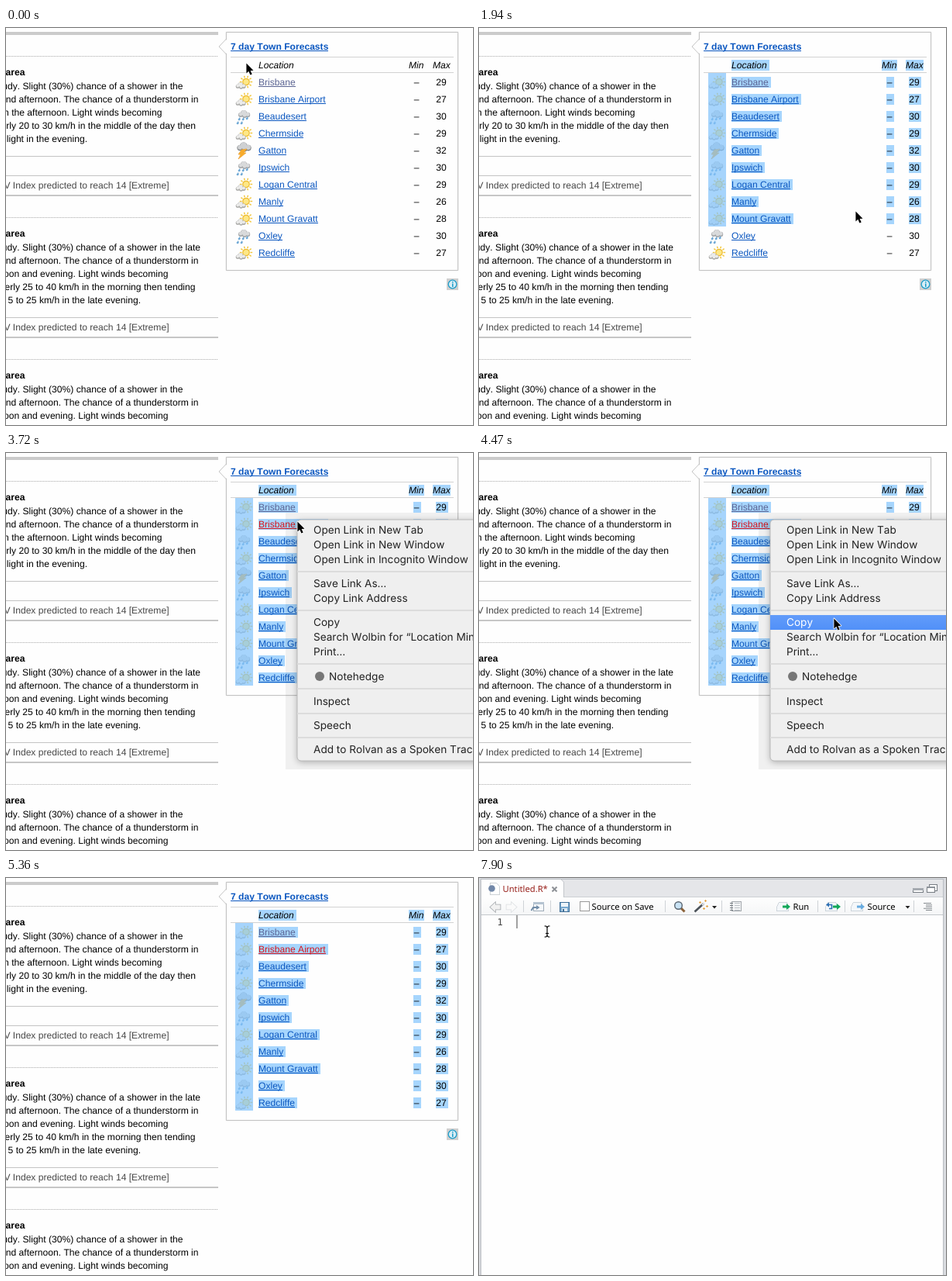
An HTML page with a canvas for the animation above (8 s loop, 603 by 512 pixels).

```html
<!DOCTYPE html>
<html lang="en">
<head>
<meta charset="utf-8">
<title>Copying a forecast table</title>
<style>
html, body { margin: 0; width: 100%; height: 100%; overflow: hidden; background: #fefefe; }
canvas { display: block; width: 603px; height: 512px; }
</style>
</head>
<body>
<canvas id="stage" width="603" height="512"></canvas>
<script>
const ctx = document.getElementById('stage').getContext('2d');
ctx.textRendering = 'geometricPrecision';
ctx.fontKerning = 'none';

const LOOP = 8000;
const SANS = '"Liberation Sans", Arial, sans-serif';
const BODY = '12.1px ' + SANS;
const BOLD = 'bold ' + BODY;
const ITALIC = 'italic ' + BODY;
const MENU = '13.6px Inter, sans-serif';
const TOOL = '500 11.2px "Noto Sans", sans-serif';
const LINK = '#0b57c0', VISITED = '#5c6593', HOVER = '#d8161b', SELECT = '#a6d5fd';

const towns = [
  ['Brisbane', 'sun', 29], ['Brisbane Airport', 'sun', 27], ['Beaudesert', 'rain', 30],
  ['Chermside', 'sun', 29], ['Gatton', 'storm', 32], ['Ipswich', 'rain', 30],
  ['Logan Central', 'sun', 29], ['Manly', 'sun', 26], ['Mount Gravatt', 'sun', 28],
  ['Oxley', 'rain', 30], ['Redcliffe', 'sun', 27]
];

// Lines of the clipped column, each with its right edge.
const thunder = ['and afternoon. The chance of a thunderstorm in', 248.5];
const winds = ['afternoon and evening. Light winds becoming', 209.5];
const days = [
  [36, [['cloudy. Slight (30%) chance of a shower in the', 228.5], thunder,
    ['in the afternoon. Light winds becoming', 201.5],
    ['easterly 20 to 30 km/h in the middle of the day then', 245],
    ['light in the evening.', 105]]],
  [244, [['cloudy. Slight (30%) chance of a shower in the late', 251], thunder, winds,
    ['easterly 25 to 40 km/h in the morning then tending', 244.5],
    ['5 to 25 km/h in the late evening.', 174]]],
  [427, [['cloudy. Slight (30%) chance of a shower in the', 228.5], thunder, winds]]
];

// Baseline, label and left edge; a bare number is a separator.
const menu = [
  [104, 'Open Link in New Tab'], [123, 'Open Link in New Window'],
  [142, 'Open Link in Incognito Window'], 152,
  [173, 'Save Link As…'], [192, 'Copy Link Address'], 202,
  [223, 'Copy'], [242, 'Search Wolbin for “Location Min Max”'], [261, 'Print…'], 271,
  [293, 'Notehedge', 417], 303, [325, 'Inspect'], 335, [356, 'Speech'], 366,
  [387, 'Add to Rolvan as a Spoken Track']
];

// Pointer legs: first step, last step, step count, destination.
const legs = [
  [150, 300, 2, 299, 45], [1050, 1200, 2, 293, 45],
  [1500, 1500, 1, 340, 65], [1640, 2240, 5, 536, 294],
  [2690, 2690, 1, 534, 291], [2840, 3420, 5, 373, 90],
  [3720, 3720, 1, 376, 88], [4020, 4470, 4, 458, 213], [4620, 4920, 3, 461, 216],
  [7010, 7010, 1, 419, 486], [7160, 7900, 6, 88, 69]
];

function pointerAt(t) {
  let x = 310, y = 45;
  for (const [from, to, n, nx, ny] of legs) {
    if (t < from) break;
    const gap = n > 1 ? (to - from) / (n - 1) : 1;
    const step = Math.min(n, 1 + Math.floor((t - from) / gap + 0.04));
    const p = 1 - Math.pow(1 - step / n, 1.5);
    x += (nx - x) * p;
    y += (ny - y) * p;
  }
  return [Math.round(x), Math.round(y)];
}

function rect(x, y, w, h, color) {
  ctx.fillStyle = color;
  ctx.fillRect(x, y, w, h);
}

function text(s, x, y, font, color = '#000', align = 'left') {
  ctx.font = font;
  ctx.fillStyle = color;
  ctx.textAlign = align;
  ctx.fillText(s, x, y);
  return ctx.measureText(s).width;
}

function link(s, x, y, font, color) {
  rect(x, y + 1, Math.round(text(s, x, y, font, color)), 1, color);
}

function trace(points, closed) {
  ctx.beginPath();
  for (let i = 0; i < points.length; i += 2) ctx.lineTo(points[i], points[i + 1]);
  if (closed) ctx.closePath();
}

function poly(points, fill, stroke, width = 1) {
  trace(points, true);
  if (stroke) {
    ctx.strokeStyle = stroke;
    ctx.lineWidth = width;
    ctx.stroke();
  }
  if (fill) {
    ctx.fillStyle = fill;
    ctx.fill();
  }
}

function line(points, color, width = 1) {
  trace(points, false);
  ctx.strokeStyle = color;
  ctx.lineWidth = width;
  ctx.stroke();
}

function disc(x, y, r, fill, stroke, width = 1) {
  ctx.beginPath();
  ctx.arc(x, y, r, 0, Math.PI * 2);
  if (fill) { ctx.fillStyle = fill; ctx.fill(); }
  if (stroke) { ctx.strokeStyle = stroke; ctx.lineWidth = width; ctx.stroke(); }
}

function frame(x, y, w, h, fill, stroke) {
  rect(x, y, w, h, stroke);
  rect(x + 1, y + 1, w - 2, h - 2, fill);
}

function at(x, y, draw) {
  ctx.save();
  ctx.translate(x, y);
  draw();
  ctx.restore();
}

function sun(x, y, r) {
  for (let i = 0; i < 10; i++) {
    const a = i * Math.PI / 5, c = Math.cos(a), s = Math.sin(a);
    line([x + c * r * 1.3, y + s * r * 1.3, x + c * r * 1.95, y + s * r * 1.95], '#f2c63a', 1.4);
  }
  disc(x, y, r, '#fde787', '#eebb2c', 1.2);
}

function cloud(x, y, k, light, dark) {
  const puffs = [[-5, 1, 3], [-1, -1, 4], [4, 1, 3.2], [0, 2, 3]];
  for (const [dx, dy, r] of puffs) disc(x + dx * k, y + dy * k + 0.4, r * k, dark);
  for (const [dx, dy, r] of puffs) disc(x + dx * k, y + dy * k - 0.3, r * k - 0.7, light);
}

// Icons sit around the row's middle line.
const icons = {
  sun() {
    sun(310, -0.5, 4.2);
    cloud(303.5, 4, 0.85, '#ebebea', '#a6a6a4');
  },
  rain() {
    cloud(308, -3.5, 1, '#d9dadb', '#a0a2a4');
    for (const [x, y] of [[301, 4], [306, 4], [311, 3], [299, 9], [304, 9]]) {
      poly([x + 1, y - 3, x + 1.8, y, x, y + 1.6, x - 1.6, y], '#6ba6d4');
    }
  },
  storm() {
    cloud(308, -5, 1.2, '#cfd1d3', '#787c80');
    poly([304, -1, 311, -2, 307, 3, 310, 3, 300, 11, 303, 5, 300, 5], '#f7ab2b', '#d98310', 0.6);
  }
};

function column() {
  rect(0, 5, 274, 4, '#cbcbcb');
  for (const [top, lines] of days) {
    for (let x = 0; x < 274; x += 2) rect(x, top, 1, 1, '#aaa');
    text('area', 24.5, top + 25, BOLD, '#000', 'right');
    lines.forEach(([s, right], i) => text(s, right, top + 43 + i * 17, BODY, '#000', 'right'));
    if (lines.length < 5) continue;
    // The first day has one more rule and a little more room.
    const gap = top === 36 ? 154 : 129;
    if (gap > 129) rect(0, top + 129, 274, 1, '#c4c4c4');
    rect(0, top + gap, 274, 1, '#c4c4c4');
    text('UV Index predicted to reach 14 [Extreme]', 210.5, top + gap + 17, BODY, '#484848', 'right');
    rect(0, top + gap + 25, 274, 2, '#c6c6c6');
  }
}

function panel() {
  ctx.save();
  ctx.shadowColor = 'rgba(0,0,0,.1)';
  ctx.shadowBlur = 2;
  frame(284, 5, 300, 308, '#fefefe', '#cacaca');
  ctx.restore();
  rect(285, 6, 298, 306, '#fefefe');
  poly([286, 14, 275, 24, 286, 34], '#fefefe');
  line([284.5, 14, 275, 24, 284.5, 34], '#c4c4c4');
  link('7 day Town Forecasts', 290, 28, BOLD, LINK);
  rect(290, 37, 288, 1, '#d2d2d2');
  rect(290, 57, 288, 1, '#d2d2d2');
  rect(569, 323, 15, 15, '#cfcfcf');
  disc(576.5, 330.5, 5.3, '#d9edf5', '#1b9cc9', 1.3);
  rect(576, 327, 1.5, 1.5, '#1b9cc9');
  rect(576, 329.5, 1.5, 4.5, '#1b9cc9');
}

function table(t, y) {
  const chosen = t < 1640 ? 0 : t >= 2240 ? 11 : Math.min(11, Math.ceil((y - 59) / 22));
  if (t >= 1500) rect(326, 41, chosen ? 49 : 46, 14, SELECT);
  if (chosen) {
    rect(520, 41, 20, 14, SELECT);
    rect(551, 41, 23, 14, SELECT);
  }
  text('Location', 326, 52, ITALIC);
  text('Min', 520, 52, ITALIC);
  text('Max', 551, 52, ITALIC);
  towns.forEach(([name, icon, max], i) => {
    const mid = 70 + i * 22;
    ctx.font = BODY;
    if (i < chosen) {
      rect(326, mid - 7, Math.round(ctx.measureText(name).width) + 3, 14, SELECT);
      rect(526, mid - 7, 10, 14, SELECT);
      rect(555, mid - 7, 16, 14, SELECT);
    }
    at(0, mid, icons[icon]);
    if (i < chosen) {
      ctx.globalAlpha = 0.7;
      rect(296, mid - 12, 23, 22, '#82c4fc');
      ctx.globalAlpha = 1;
    }
    const color = i === 1 && t >= 3270 ? HOVER : i ? LINK : VISITED;
    link(name, 326, mid + 4, BODY, color);
    text('–', 530, mid + 4, BODY, '#000', 'center');
    text(max, 562, mid + 4, BODY, '#000', 'center');
  });
}

function contextMenu(t, y) {
  ctx.save();
  ctx.globalAlpha = t < 5070 ? 1 : t < 5220 ? 0.6 : 0.25;
  rect(361, 77, 242, 331, 'rgba(0,0,0,.055)');
  ctx.beginPath();
  ctx.roundRect(376, 86, 260, 311, 5);
  ctx.save();
  ctx.shadowColor = 'rgba(0,0,0,.28)';
  ctx.shadowBlur = 9;
  ctx.shadowOffsetY = 2;
  ctx.fillStyle = '#efefef';
  ctx.fill();
  ctx.restore();
  ctx.strokeStyle = '#bababa';
  ctx.lineWidth = 1;
  ctx.stroke();
  for (const item of menu) {
    if (!item.length) {
      rect(376, item, 227, 2, '#dcdcdc');
      continue;
    }
    const [base, label, x = 397] = item;
    const lit = t >= 4020 && y >= base - 14 && y < base + 5 && !(t >= 4770 && t < 4920);
    if (lit) {
      const blue = ctx.createLinearGradient(0, base - 14, 0, base + 5);
      blue.addColorStop(0, '#629cfa');
      blue.addColorStop(1, '#5190f8');
      rect(376, base - 14, 227, 19, blue);
    }
    if (x > 397) disc(405, base - 5, 6, '#777');
    text(label, x, base, MENU, lit ? '#fff' : '#222');
  }
  ctx.restore();
}

function arrow() {
  ctx.lineJoin = 'round';
  poly([0.4, 0.4, 0.4, 13.4, 3.3, 10.7, 5.4, 15.6, 7.7, 14.6, 5.6, 9.9, 9.5, 9.7], '#000', '#fff', 1.6);
}

function beam() {
  for (const [color, w] of [['#fff', 3], ['#000', 1.2]]) {
    for (const s of [-1, 1]) {
      line([-3.5, s * 7, -1.5, s * 7, 0, s * 5.5, 1.5, s * 7, 3.5, s * 7], color, w);
    }
    line([0, -6, 0, 6], color, w);
    line([-2, 2.5, 2, 2.5], color, w);
  }
}

function hand() {
  ctx.lineJoin = 'round';
  poly([0, 1, 1.5, 0, 3, 1, 3, 6, 6, 6, 9, 7, 11, 9, 10, 13, 9, 16, 2, 16, -3, 10, -2.5, 8.5, 0, 10.5],
    '#fff', '#000', 2);
}

function tray(x) {
  poly([x, 38, x + 3, 31.5, x + 13, 31.5, x + 15, 38, x + 15, 42.5, x, 42.5], '#f4f7fa', '#a9b4bf');
}

function dart(x, y, color) {
  at(x, y, () => poly([0, -1.5, 5, -1.5, 5, -4, 10, 0, 5, 4, 5, 1.5, 0, 1.5], color));
}

function drop(x) {
  poly([x - 3, 36, x + 3, 36, x, 39.5], '#222');
}

function toolbar() {
  for (const x of [57, 92, 240, 313, 437, 472, 561]) rect(x, 29, 1, 15, '#cfd3d7');
  const back = [0, 0, 6.5, -6, 6.5, -3, 13, -3, 13, 3, 6.5, 3, 6.5, 6];
  at(14.5, 37.5, () => poly(back, '#f1f1f1', '#a5a9ad', 1.6));
  at(48.5, 37.5, () => { ctx.scale(-1, 1); poly(back, '#fafafa', '#dcdfe2', 1.6); });

  frame(70, 31, 14, 12, '#f6f9fb', '#9eabb8');
  rect(70, 31, 14, 3, '#b4c3d1');
  line([67.5, 42, 70, 38, 75, 38], '#728da8', 2);
  poly([74, 35, 78.5, 38, 74, 41], '#728da8');

  frame(104, 31, 13, 13, '#79a9cf', '#406f98');
  rect(106, 32, 9, 5, '#eef4f9');
  rect(107, 39, 7, 4, '#dfe9f1');
  rect(108, 40, 2, 3, '#406f98');

  frame(130, 30, 13, 13, '#fff', '#9a9a9a');
  text('Source on Save', 145.5, 41, TOOL);

  line([261, 39, 265.5, 43.5], '#8b6239', 3);
  disc(257.5, 35.5, 4.8, '#c8e2f4', '#5a6570', 1.4);

  line([278.5, 43.5, 290, 33], '#4b5259', 2.6);
  line([288, 35, 291, 32], '#dfe4e8', 2);
  for (const [x, y] of [[285, 31], [292, 29], [294, 36], [290, 39]]) {
    rect(x - 1, y, 3, 1, '#e3a64a');
    rect(x, y - 1, 1, 3, '#e3a64a');
  }
  drop(304);

  frame(326, 30, 13, 13, '#f4f5f6', '#a2a7ac');
  for (let y = 32; y < 43; y += 3) {
    rect(324, y, 4, 1, '#777d83');
    rect(330, y, 7, 1, '#bcc1c6');
  }

  tray(384.5);
  dart(392, 37, '#12a85a');
  text('Run', 405.5, 41, TOOL);
  tray(447.5);
  dart(457, 37, '#12a85a');
  line([450, 34.5, 455.5, 34.5, 455.5, 39.5, 452, 39.5], '#2c6fb4', 1.6);
  poly([448, 34.5, 452, 31.5, 452, 37.5], '#2c6fb4');
  tray(480.5);
  dart(488, 37, '#69ace0');
  text('Source', 501.5, 41, TOOL);
  drop(553.5);
  [[574, 10], [577, 8], [577, 8], [574, 11], [577, 8]].forEach(([x, w], i) =>
    rect(x, 32 + i * 2.25, w, 1, '#858a8f'));
}

function editor(t) {
  rect(0, 0, 603, 512, '#d9dbdf');
  rect(2, 1, 598, 511, '#b9bdc3');
  rect(3, 2, 596, 510, '#fefefe');
  rect(3, 2, 596, 23, '#e5e6e9');
  rect(3, 24, 596, 1, '#ccd0d4');
  poly([3, 25, 3, 2, 106, 2, 109, 5, 109, 25], '#fefefe');
  line([106, 2, 109.5, 5, 109.5, 25], '#c3c7cb');
  const shade = ctx.createLinearGradient(0, 25, 0, 47);
  shade.addColorStop(0, '#fefefe');
  shade.addColorStop(1, '#f5f6f7');
  rect(3, 25, 596, 22, shade);
  rect(3, 47, 596, 1, '#c3c7cb');

  poly([14.5, 6.5, 22.5, 6.5, 26.5, 10.5, 26.5, 21.5, 14.5, 21.5], '#fff', '#9ba4ad');
  disc(16.5, 13.5, 4.3, '#7187a8');
  text('Untitled.R*', 30.5, 18, TOOL, '#98201b');
  line([94.5, 11.5, 100.5, 17.5], '#8d9196', 2);
  line([94.5, 17.5, 100.5, 11.5], '#8d9196', 2);

  frame(560, 13, 14, 6, '#fff', '#777d83');
  rect(560, 13, 14, 3, '#a5aab0');
  frame(581, 8, 11, 9, '#fff', '#777d83');
  frame(578, 11, 11, 8, '#fff', '#777d83');
  rect(578, 11, 11, 2, '#8c9299');

  toolbar();
  text('1', 23.5, 61, '12px "DejaVu Sans Mono", monospace', '#444');
  if (t < 7010 || t >= 7460) rect(48, 48, 2, 17, '#a0a0a0');
}

function draw(t) {
  const [x, y] = pointerAt(t);
  if (t >= 6710) {
    editor(t);
    if (t >= 7010) at(x, y, beam);
    return;
  }
  rect(0, 0, 603, 512, '#fefefe');
  column();
  panel();
  table(t, y);
  if (t >= 5360) return;
  if (t >= 3720) contextMenu(t, y);
  const shape = t >= 1500 && t < 1640 ? beam : t >= 3270 && t < 3720 ? hand : arrow;
  at(x, y, shape);
}

const start = performance.now();
function tick() {
  draw((performance.now() - start) % LOOP);
  requestAnimationFrame(tick);
}
tick();
</script>
</body>
</html>
```
